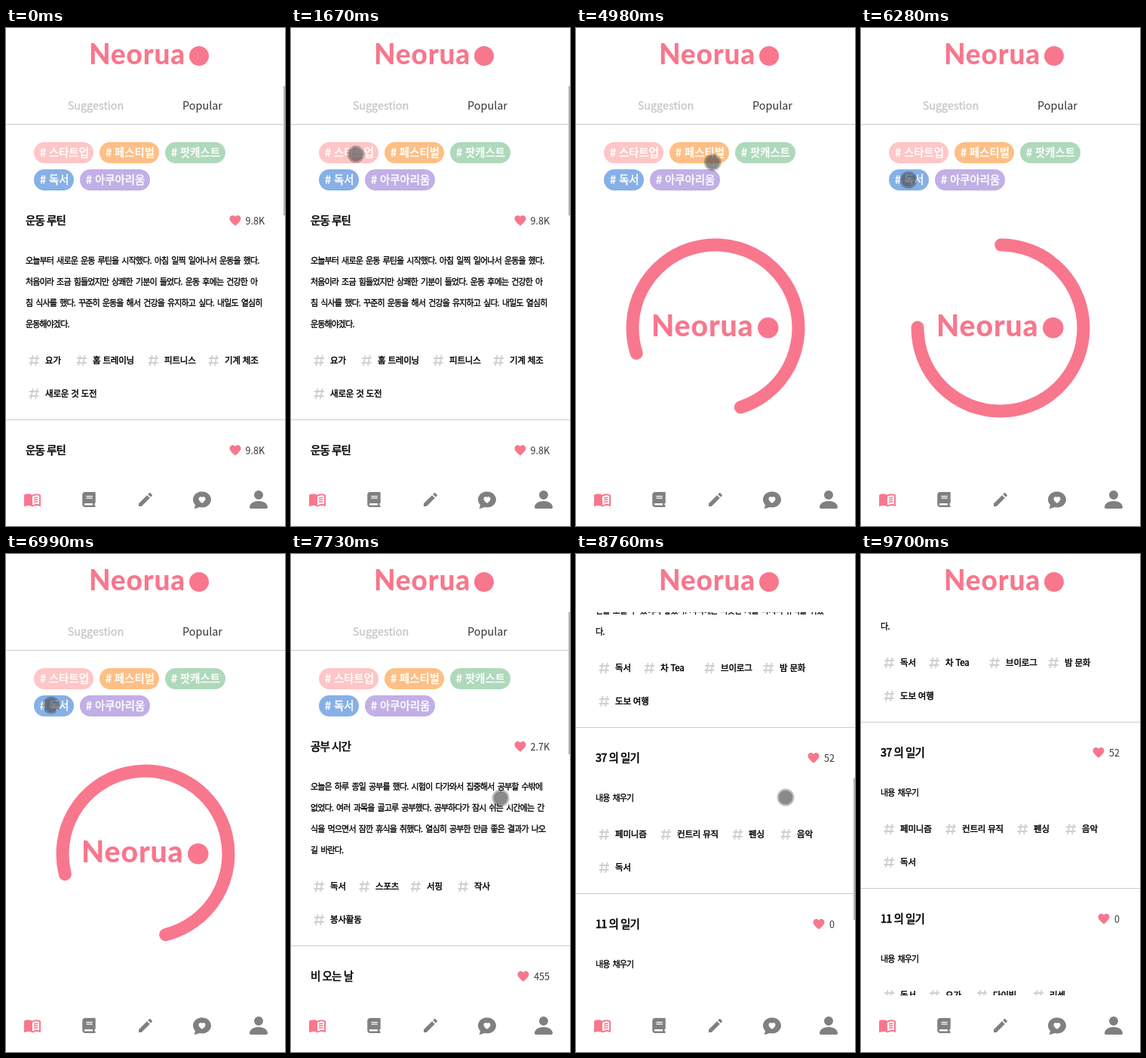
These frames come from a looping animation (370x659 px, 9770 ms). An HTML page:

```html
<!DOCTYPE html>
<html lang="ko">
<head>
<meta charset="utf-8">
<style>
  html, body { margin: 0; width: 100%; height: 100%; overflow: hidden; background: #fff; }
  svg { display: block; width: 370px; height: 659px; }
  text { font-family: "Noto Sans CJK KR", "Noto Sans KR", "Noto Sans CJK", "Noto Sans CJK JP", sans-serif; white-space: pre; }
  .tab { font-size: 14.4px; text-anchor: middle; }
  .chip { font-size: 14.4px; fill: #fff; stroke: #fff; stroke-width: .5; }
  .title { font-size: 14.5px; letter-spacing: -.9px; stroke: #000; stroke-width: .6; }
  .body { font-size: 11px; letter-spacing: -.85px; word-spacing: 1.8px; stroke: #000; stroke-width: .3; }
  .tag { font-size: 11.5px; letter-spacing: -.2px; stroke: #000; stroke-width: .45; }
  .likes { font-size: 12.5px; fill: #333; text-anchor: end; }
  .empty { font-size: 16px; fill: #777; text-anchor: middle; }
  .brand { font: 800 37px Lato, sans-serif; letter-spacing: .8px; fill: #f8778d; }
</style>
</head>
<body>
<svg id="stage" viewBox="0 0 370 659"></svg>
<script>
const LOOP = 9770;
const PINK = '#f8778d', GREY = '#808080';
const HEART = 'M12 21.35l-1.45-1.32C5.4 15.36 2 12.28 2 8.5 2 5.42 4.42 3 7.5 3c1.74 0 3.41.81 4.5 2.09C13.09 3.81 14.76 3 16.5 3 19.58 3 22 5.42 22 8.5c0 3.78-3.4 6.86-8.55 11.54z';

// y is the vertical middle of the text
const text = (x, y, s, cls, extra = '') =>
  `<text x="${x}" y="${y}" dy=".37em" class="${cls}" ${extra}>${s}</text>`;
const heart = (x, y) =>
  `<path d="${HEART}" fill="${PINK}" transform="translate(${x} ${y}) scale(.75) translate(-12 -12.2)"/>`;
const icon = (x, y, scale, fill, d) =>
  `<path d="${d}" fill="${fill}" fill-rule="evenodd" transform="translate(${x} ${y}) scale(${scale})"/>`;
const rule = y => `<path d="M0 ${y + .5}H370" stroke="#ccc"/>`;
const brand = (x, y, scale) => `<g transform="translate(${x} ${y}) scale(${scale})">
  <text class="brand" y="48">Neorua</text><circle cx="146" cy="37" r="13" fill="${PINK}"/></g>`;

const chip = (x, y, w, fill, label) =>
  `<rect x="${x}" y="${y}" width="${w}" height="28" rx="14" fill="${fill}"/>` +
  text(x + 8, y + 14, '# ' + label, 'chip');

const hash = (x, y) => `<path transform="translate(${x} ${y})" fill="none" stroke="#d0d0d0" stroke-width="1.8"
  d="M-1.500 -7L-4 7M4.500 -7L2 7M-6 -3H7M-6.500 3H6.500"/>`;
const tag = ([x, label], y) => hash(x, y) + text(x + 15, y, label, 'tag');

function card(top, { title, likes, lines, tags }) {
  const mid = top + 41;
  const likesWidth = likes.length * 7 - (likes.includes('.') ? 3 : 0);
  let svg = text(26, mid, title, 'title') + text(343, mid, likes, 'likes') +
    heart(343 - likesWidth - 14, mid);
  let y = mid + 53;
  lines.forEach((line, i) => svg += text(26, y + 28 * i, line, 'body'));
  y += 28 * (lines.length - 1) + 48;
  tags.forEach((row, i) => svg += row.map(t => tag(t, y + 44 * i)).join(''));
  const bottom = y + 44 * (tags.length - 1) + 34;
  return { svg: svg + rule(bottom), bottom };
}

function list(cards) {
  let top = 214, svg = '';
  for (const c of cards) {
    const drawn = card(top, c);
    svg += drawn.svg;
    top = drawn.bottom;
  }
  return svg;
}

const workout = {
  title: '운동 루틴', likes: '9.8K',
  lines: ['오늘부터 새로운 운동 루틴을 시작했다. 아침 일찍 일어나서 운동을 했다.',
    '처음이라 조금 힘들었지만 상쾌한 기분이 들었다. 운동 후에는 건강한 아',
    '침 식사를 했다. 꾸준히 운동을 해서 건강을 유지하고 싶다. 내일도 열심히',
    '운동해야겠다.'],
  tags: [[[37, '요가'], [100, '홈 트레이닝'], [195, '피트니스'], [275, '기계 체조']], [[37, '새로운 것 도전']]]
};
const study = {
  title: '공부 시간', likes: '2.7K',
  lines: ['오늘은 하루 종일 공부를 했다. 시험이 다가와서 집중해서 공부할 수밖에',
    '없었다. 여러 과목을 골고루 공부했다. 공부하다가 잠시 쉬는 시간에는 간',
    '식을 먹으면서 잠깐 휴식을 취했다. 열심히 공부한 만큼 좋은 결과가 나오',
    '길 바란다.'],
  tags: [[[37, '독서'], [97, '스포츠'], [165, '서핑'], [228, '작사']], [[37, '봉사활동']]]
};
const rain = {
  title: '비 오는 날', likes: '455',
  lines: ['오늘 하루 종일 비가 내렸다. 비 소리를 들으면서 집에서 편안하게 책을',
    '읽었다. 창밖을 보니 나무들이 빗물에 젖어 있었다. 오랜만에 고요한 시',
    '간을 보낼 수 있어서 좋았다. 저녁에는 따뜻한 차를 마시며 휴식을 취했',
    '다.'],
  tags: [[[37, '독서'], [97, '차 Tea'], [177, '브이로그'], [255, '밤 문화']], [[37, '도보 여행']]]
};
const note = (n, likes, tags) => ({ title: n + ' 의 일기', likes, lines: ['내용 채우기'], tags });
const note37 = note(37, '52', [[[37, '페미니즘'], [119, '컨트리 뮤직'], [214, '펜싱'], [278, '음악']], [[37, '독서']]]);
const note11 = note(11, '0', [[[37, '독서'], [97, '요가'], [160, '다이빙'], [235, '리셋']]]);
const note23 = note(23, '3', [[[37, '스타트업'], [119, '독서'], [179, '음악']], [[37, '요가']]]);

const views = {
  popular: list([workout, workout]),
  startup: list([note23]),
  reading: list([study, rain, note37, note11]),
  empty: text(184.5, 347, '조건에 맞는 일기가 없습니다.', 'empty'),
  loading: `<path id="ring" d="M185 287A110 110 0 1 1 75 397" fill="none" stroke="${PINK}"
    stroke-width="17" stroke-linecap="round"/>` + brand(100, 357.5, 1.06)
};

const nav = '<rect y="584" width="370" height="75" fill="#fff"/>' +
  icon(23, 612, 1, PINK, 'M21 5c-1.11-.35-2.33-.5-3.5-.5-1.95 0-4.05.4-5.5 1.5-1.45-1.1-3.55-1.5-5.5-1.5S2.45 4.9 1 6v14.65c0 .25.25.5.5.5.1 0 .15-.05.25-.05C3.1 20.45 5.05 20 6.5 20c1.95 0 4.05.4 5.5 1.5 1.35-.85 3.8-1.5 5.5-1.5 1.65 0 3.35.3 4.75 1.05.1.05.15.05.25.05.25 0 .5-.25.5-.5V6c-.6-.45-1.25-.75-2-1zm0 13.5c-1.1-.35-2.3-.5-3.5-.5-1.7 0-4.15.65-5.5 1.5V8c1.35-.85 3.8-1.5 5.5-1.5 1.2 0 2.4.15 3.5.5z') +
  `<path fill="none" stroke="${PINK}" stroke-width="1.5" d="M37 622.200Q40 621 42.500 621.500M37 624.900Q40 623.700 42.500 624.200M37 627.600Q40 626.400 42.500 626.900"/>` +
  icon(101.25, 614, .039, GREY, 'M96 0C43 0 0 43 0 96V416c0 53 43 96 96 96H416c17.7 0 32-14.3 32-32s-14.3-32-32-32V384c17.7 0 32-14.3 32-32V32c0-17.7-14.3-32-32-32zM96 384H352v64H96c-17.7 0-32-14.3-32-32s14.3-32 32-32zM144 128H336a16 16 0 0 1 0 32H144a16 16 0 0 1 0-32zM144 192H336a16 16 0 0 1 0 32H144a16 16 0 0 1 0-32z') +
  icon(173, 612, 1, GREY, 'M3 17.25V21h3.75L17.81 9.94l-3.75-3.75zM20.71 7.04c.39-.39.39-1.02 0-1.41l-2.34-2.34a1 1 0 0 0-1.41 0l-1.83 1.83 3.75 3.75z') +
  icon(248, 612, 1.5, GREY, 'M8 15c4.418 0 8-3.134 8-7s-3.582-7-8-7-8 3.134-8 7c0 1.76.743 3.37 1.97 4.6-.097 1.016-.417 2.13-.771 2.966-.079.186.074.394.273.362 2.256-.37 3.597-.938 4.18-1.234A9 9 0 0 0 8 15m0-9.007c1.664-1.711 5.825 1.283 0 5.132-5.825-3.85-1.664-6.843 0-5.132') +
  icon(319, 608, 2, GREY, 'M3 14s-1 0-1-1 1-4 6-4 6 3 6 4-1 1-1 1zm5-6a3 3 0 1 0 0-6 3 3 0 0 0 0 6');

document.getElementById('stage').innerHTML = `
  <rect width="370" height="659" fill="#fff"/>
  <clipPath id="window"><rect y="77" width="370" height="507"/></clipPath>
  <g clip-path="url(#window)"><g id="page">` +
    text(119, 103, 'Suggestion', 'tab', 'fill="#c6c6c6" stroke="#c6c6c6" stroke-width=".3"') +
    text(260.5, 103, 'Popular', 'tab', 'fill="#333"') + rule(127) +
    chip(37, 151, 79, '#fec6c6', '스타트업') +
    chip(124, 151, 79, '#fdbf85', '페스티벌') +
    chip(211, 151, 80, '#aed9bb', '팟캐스트') +
    chip(37, 187, 53, '#86b0e6', '독서') +
    chip(98, 187, 93, '#c1afe6', '아쿠아리움') +
    Object.entries(views).map(([name, svg]) => `<g id="${name}">${svg}</g>`).join('') +
  `</g></g>` + brand(110, 0, 1) + nav + `
  <rect id="thumb" x="368" width="2" fill="#b5b5b5"/>
  <g id="cursor"><circle r="11.5" fill="#000" opacity=".25"/><circle r="9.3" fill="#555" opacity=".5"/></g>`;

const el = id => document.getElementById(id);
const names = Object.keys(views);
const parts = Object.fromEntries([...names, 'page', 'ring', 'thumb', 'cursor'].map(id => [id, el(id)]));

const schedule = [[0, 'popular'], [1850, 'loading'], [1990, 'startup'], [3340, 'loading'], [3600, 'empty'],
  [4500, 'loading'], [5640, 'empty'], [6230, 'loading'], [7015, 'reading']];

// time, x, y
const path = [[50, 324, 636], [730, 133, 272], [1070, 133, 271], [1430, 86, 152], [1650, 86, 152],
  [1670, 86, 167], [1700, 86, 174], [2800, 86, 174], [3150, 181, 166], [3660, 181, 166],
  [4260, 251, 164], [4700, 251, 164], [5380, 63, 201], [6700, 63, 201], [6990, 60, 200],
  [7150, 63, 201], [7700, 278, 323], [8760, 278, 322], [8960, 334, 430], [9060, 334, 430], [9690, 366, 672]];

const clamp = v => Math.min(1, Math.max(0, v));
const smooth = p => p * p * (3 - 2 * p);

function cursorAt(t) {
  const i = Math.max(1, path.findIndex(p => p[0] >= t));
  const [t0, x0, y0] = path[i - 1], [t1, x1, y1] = path[i];
  const p = smooth(clamp((t - t0) / (t1 - t0)));
  return [x0 + (x1 - x0) * p, y0 + (y1 - y0) * p];
}

const show = (node, on) => node.setAttribute('display', on ? 'inline' : 'none');

function render(t) {
  const view = schedule.filter(s => s[0] <= t).pop()[1];
  names.forEach(name => show(parts[name], name === view));

  const scroll = Math.round(600 * Math.sin(Math.PI / 2 * clamp((t - 8000) / 846)));
  parts.page.setAttribute('transform', `translate(0 ${-scroll})`);
  parts.ring.setAttribute('transform', `rotate(${(t - 6280) * .36} 185 397)`);

  const reading = view === 'reading';
  show(parts.thumb, view === 'popular' || reading && t < 9560);
  parts.thumb.setAttribute('y', 77 + scroll * .37);
  parts.thumb.setAttribute('height', reading ? 188 : 171);

  const moving = t >= 50 && t < 9690;
  show(parts.cursor, moving);
  if (moving) parts.cursor.setAttribute('transform', `translate(${cursorAt(t)})`);
}

const start = performance.now();
function tick() {
  render((performance.now() - start) % LOOP);
  requestAnimationFrame(tick);
}
tick();
</script>
</body>
</html>
```
